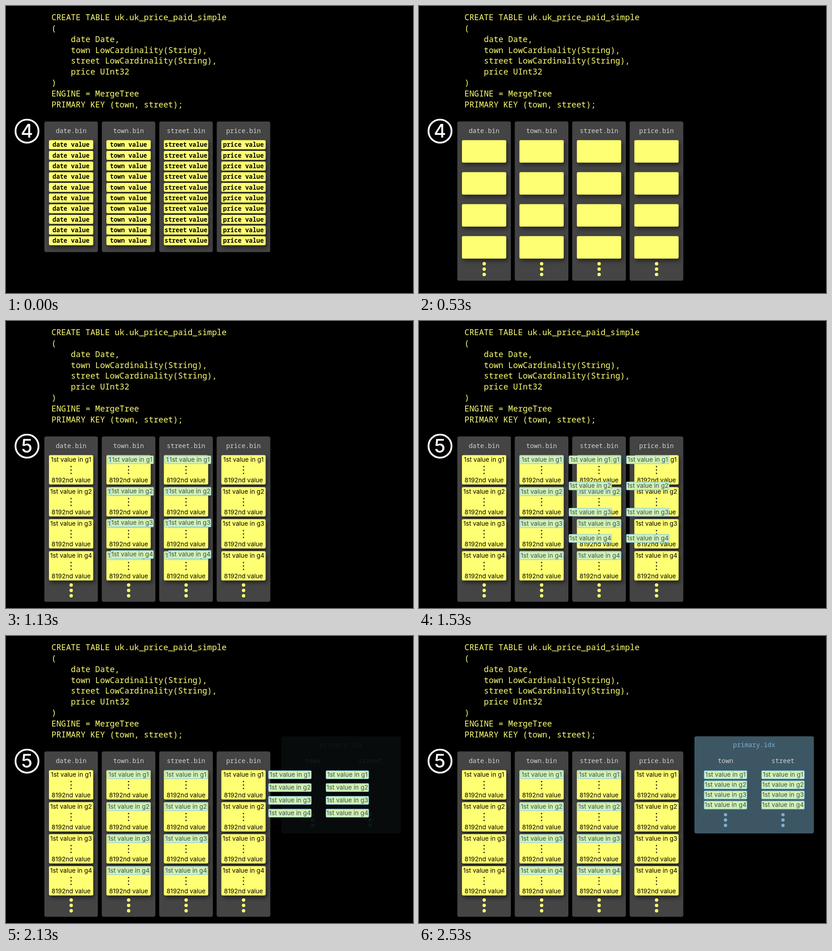
An HTML page that plays this animation: 891 px wide and 628 px high, repeating every 4330 ms.

```html
<!DOCTYPE html>
<html lang="en">
<head>
<meta charset="utf-8">
<title>Primary index creation</title>
<style>
  html, body { margin: 0; width: 100%; height: 100%; overflow: hidden; background: #000; }
  svg { display: block; width: 891px; height: 628px; }
  text { white-space: pre; font: 13.6px Inter, sans-serif; }
  .mono { font: 14px "Noto Sans Mono", monospace; }
  .code { font-size: 17.75px; font-weight: 500; fill: #ffff73; }
  .row { font-size: 13.5px; font-weight: 600; }
  .step { font-size: 41px; font-weight: 500; fill: #fff; }
  .mid { text-anchor: middle; }
  .head { fill: #d2d2d2; }
  .panel { fill: #444; }
  .yellow { fill: #ffff73; }
  .blue { fill: #7db1d3; }
  .shadow { filter: drop-shadow(3px 5px 4px rgba(0, 0, 0, .5)); }
  .label rect { fill: #d2f1b1; stroke: #8bcfee; stroke-width: 1.3; }
  .label text { fill: #3b5053; }
</style>
</head>
<body>
<svg id="stage" viewBox="0 0 891 628"></svg>
<script>
const FRAME = 1000 / 15, FRAMES = 65;
const ROW = 23.35, GRANULE = 70;
const columns = ['date', 'town', 'street', 'price'];
const code = `CREATE TABLE uk.uk_price_paid_simple
(
    date Date,
    town LowCardinality(String),
    street LowCardinality(String),
    price UInt32
)
ENGINE = MergeTree
PRIMARY KEY (town, street);`;

const repeat = (count, draw) => Array.from({ length: count }, (_, i) => draw(i)).join('');
const eachColumn = draw => columns.map((name, i) => draw(84 + 125.8 * i, name)).join('');
const rect = (x, y, w, h, cls = '', r = 3, more = '') =>
  `<rect class="${cls}" x="${x}" y="${y}" width="${w}" height="${h}" rx="${r}" ${more}/>`;
const text = (x, y, str, cls = 'mid', more = '') => `<text class="${cls}" x="${x}" y="${y}" ${more}>${str}</text>`;
const dots = (x, y, gap, r, cls = '') =>
  repeat(3, i => `<circle class="${cls}" cx="${x}" cy="${y + gap * i}" r="${r}"/>`);
const group = (id, body, cls = '') => `<g id="${id}" class="${cls}">${body}</g>`;

const panels = () => eachColumn(x => rect(x, 252.8, 117, 0, 'panel', 4));
const label = (x, i) => `<g class="label">${rect(x - 46.6, 294.9, 93.2, 17.4, '', 1.5)}${text(x, 308, `1st value in g${i + 1}`)}</g>`;
const labels = place => [268.6, 394.4].map(x => repeat(4, i => `<g ${place(i)}>${label(x, i)}</g>`)).join('');

const rows = group('rowBoxes', eachColumn(x => repeat(10, i => rect(x + 10, 293.6 + ROW * i, 97, 19.8, 'yellow'))), 'shadow') +
  eachColumn((x, name) => repeat(10, i => text(x + 58.3, 308.2 + ROW * i, name + ' value', 'mono row mid',
    name === 'street' ? 'word-spacing="-3.5"' : '')));

const blocks = panels() +
  group('blockBoxes', eachColumn(x => repeat(4, i => rect(x + 10, 293.6 + GRANULE * i, 97, 49, 'yellow block'))), 'shadow') +
  group('granuleText', eachColumn(x => repeat(4, i => {
    const y = GRANULE * i, cx = x + 58.5;
    return text(cx, 308 + y, `1st value in g${i + 1}`) + dots(cx, 318.6 + y, 7.5, 1.4) + text(cx, 353.4 + y, '8192nd value');
  }))) +
  group('more', eachColumn(x => dots(x + 58.7, 564, 11.7, 3.7, 'yellow')));

const index = rect(603, 219.5, 261.5, 212.5, '', 4, 'fill="#3d5663"') +
  text(733.7, 243, 'primary.idx', 'mono mid blue') +
  ['town', 'street'].map((name, i) => {
    const x = 671 + 125.8 * i;
    return text(x, 278.2, name, 'mono mid head') + dots(x, 391, 11.7, 3.6, 'blue');
  }).join('');

const stage = document.getElementById('stage');
stage.innerHTML = code.split('\n').map((line, i) => text(99.5, 31 + 23.87 * i, line, 'mono code')).join('') +
  '<circle cx="46" cy="273.8" r="25.2" fill="none" stroke="#fff" stroke-width="3.9"/>' +
  text(45.6, 288.4, '4', 'step mid', 'id="four"') + text(45.6, 288.4, '5', 'step mid', 'id="five"') +
  panels() + group('rows', rows) + group('blocks', blocks) +
  eachColumn((x, name) => text(x + 58.5, 278.2, name + '.bin', 'mono mid head')) +
  group('index', index) +
  group('marked', labels(i => `transform="translate(0 ${GRANULE * i})"`)) +
  group('moving', labels(() => 'class="mover"'));

const el = id => document.getElementById(id);
const all = selector => [...stage.querySelectorAll(selector)];
const panelRects = all('.panel'), blockRects = all('.block'), movers = all('.mover');
const fade = (id, opacity) => el(id).setAttribute('opacity', opacity);

const clamp = v => Math.min(1, Math.max(0, v));
const ease = v => v < .5 ? 2 * v * v : 1 - 2 * (1 - v) ** 2;
const phase = (n, start, length) => ease(clamp((n - start) / length));
// Accelerates to a peak at step 13, then brakes.
const travel = k => k < 13
  ? .557 * clamp((k - 1.2) / 11.8) ** 1.8
  : 1 - .443 * clamp((23.57 - k) / 10.57) ** 2;

function render(n) {
  const merge = phase(n, 0, 8), grow = phase(n, 8, 4), move = travel(n - 14);
  panelRects.forEach(r => r.setAttribute('height', 285.7 + 62.6 * merge + 13.2 * grow));
  blockRects.forEach(r => r.setAttribute('height', 49.1 + 15 * grow));
  el('more').setAttribute('transform', `translate(0 ${13.8 * grow})`);
  fade('rows', merge < 1 ? 1 : 0);
  fade('blocks', merge);
  fade('granuleText', grow);
  fade('four', 1 - grow);
  fade('five', grow);
  fade('marked', n > 14 ? 1 : 0);
  fade('moving', n > 14 ? 1 : 0);
  fade('index', phase(n, 30, 8));
  movers.forEach((m, j) => {
    const y = (j % 4) * (GRANULE - 47.9 * move);
    m.setAttribute('transform', `translate(${402.4 * move} ${y})`);
  });
}

function tick() {
  const t = performance.now() % 4330;
  render(Math.min(FRAMES - 1, Math.floor((t + 7) / FRAME)));
  requestAnimationFrame(tick);
}
tick();
</script>
</body>
</html>
```
